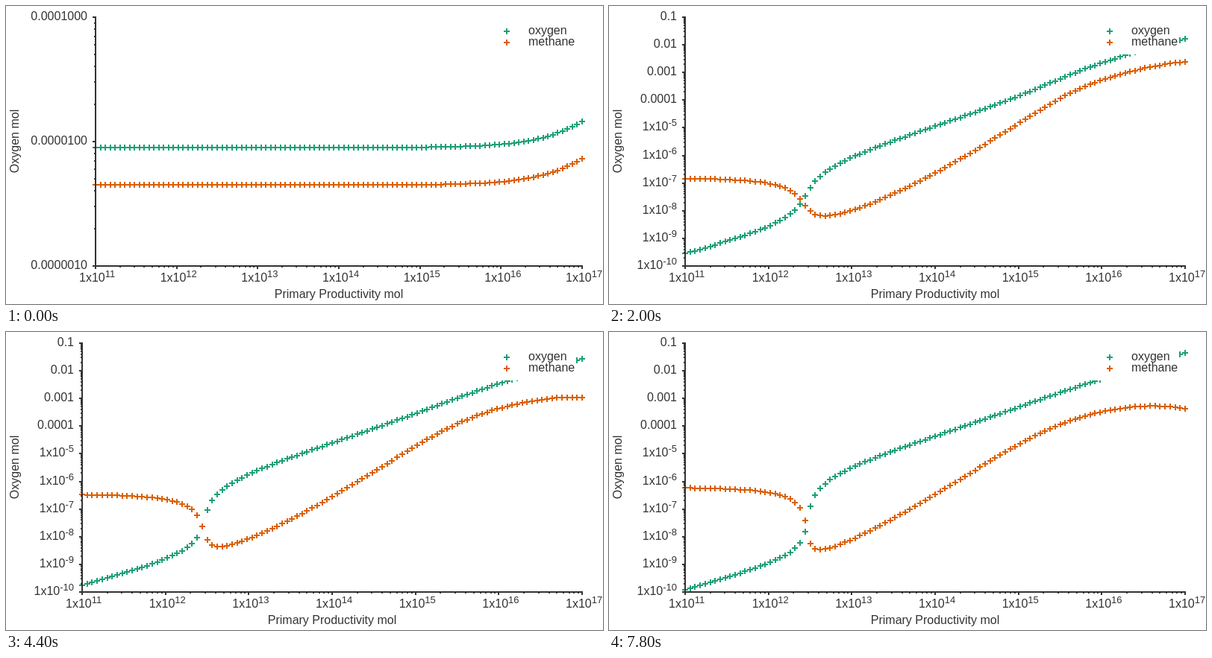
An HTML page with a canvas for the animation above (8 s loop, 800x400 px).

```html
<!DOCTYPE html>
<html lang="en">
<head>
<meta charset="utf-8">
<title>Oxygen and methane</title>
<style>
  html, body { margin: 0; width: 100%; height: 100%; overflow: hidden; background: #fff; }
  canvas { display: block; }
</style>
</head>
<body>
<canvas id="chart" width="800" height="400"></canvas>
<script>
const ctx = document.getElementById('chart').getContext('2d');
const STEP = 200, STEPS = 40, POINTS = 101;
const TOP = 15, BOTTOM = 349, RIGHT = 772;
const INK = '#333', GREEN = '#1b9e77', ORANGE = '#d95f02';
const FAMILY = '"Liberation Sans", Arial, sans-serif';
const BASE_FONT = '16px ' + FAMILY, SUP_FONT = '13px ' + FAMILY;

// Chemistry: amounts are fractions of the whole atmosphere.
const AIR = 1.773e20;            // mol
const GAIN = 1.12e-20;           // net oxidant per mol of productivity and step
const BALANCE = 2.97e12;         // productivity at which sources cancel
const ESCAPE = 0.006;            // methane escape per step

const productivity = i => 10 ** (11 + 6 * i / (POINTS - 1));

// log10 of the oxidation rate constant as a quartic in log10(oxygen)
function logRate(oxygen) {
  const p = Math.log10(oxygen * AIR);
  return (((0.0030084 * p - 0.1655405) * p + 3.2305351) * p - 25.8343054) * p + 71.5397861;
}

// share of production that escapes respiration
function share(oxygen) {
  const mol = oxygen * AIR;
  return 1 / (1 + mol / 1.36e19) / (1 + mol / 2.73e17);
}

// Steady state for a given surplus, where surplus = oxygen - 2 * methane
function balance(surplus, p) {
  let lo = -12, hi = 0, pair;
  for (let k = 0; k < 45; k++) {
    const mid = (lo + hi) / 2, small = 10 ** mid;
    pair = surplus > 0 ? [surplus + 2 * small, small] : [small, (small - surplus) / 2];
    const [o, m] = pair;
    const loss = logRate(o) + 0.7 * Math.log10(m * AIR);
    if (loss > Math.log10(share(o) * p)) hi = mid; else lo = mid;
  }
  return pair;
}

function simulate() {
  const steps = [[]];
  const surplus = new Array(POINTS).fill(0);
  for (let i = 0; i < POINTS; i++) {
    const o = 8.95e-6 + 5.55e-23 * productivity(i);
    steps[0].push([o, o / 2]);
  }
  for (let n = 1; n < STEPS; n++) {
    steps.push(surplus.map((s, i) => {
      const p = productivity(i);
      surplus[i] = s + GAIN * (p - BALANCE) + ESCAPE * steps[n - 1][i][1];
      return balance(surplus[i], p);
    }));
  }
  return steps;
}

const steps = simulate();

const FIRST = { left: 120, low: -6, high: -4 };
const LATER = { left: 102, low: -10, high: -1 };

function text(str, x, y, align = 'left', font = BASE_FONT) {
  ctx.font = font;
  ctx.textAlign = align;
  ctx.fillStyle = INK;
  ctx.fillText(str, x, y);
}

function cross(x, y, color) {
  x = Math.round(x);
  y = Math.round(y);
  ctx.fillStyle = color;
  ctx.fillRect(x - 4, y - 1, 8, 2);
  ctx.fillRect(x - 1, y - 4, 2, 8);
}

function power(exp, x, y) {
  text('1x10', x, y);
  ctx.font = BASE_FONT;
  text(exp, x + ctx.measureText('1x10').width, y - 6, 'left', SUP_FONT);
}

function powerWidth(exp) {
  ctx.font = BASE_FONT;
  const base = ctx.measureText('1x10').width;
  ctx.font = SUP_FONT;
  return base + ctx.measureText(exp).width;
}

// Calls mark(position, isMajor) for each tick of a log axis
function logTicks(low, high, mark) {
  for (let d = low; d <= high; d++) {
    mark(d, true);
    for (let k = 2; k < 10 && d < high; k++) mark(d + Math.log10(k), false);
  }
}

function drawAxes(axis, toX, toY) {
  ctx.fillStyle = INK;
  ctx.fillRect(axis.left - 1, TOP - 1, 2, BOTTOM - TOP + 2);
  ctx.fillRect(axis.left - 1, BOTTOM - 1, RIGHT - axis.left + 2, 2);
  logTicks(11, 17, (v, major) => {
    ctx.fillRect(Math.round(toX(v)) - 1, BOTTOM, 2, major ? 4 : 2);
  });
  logTicks(axis.low, axis.high, (v, major) => {
    const len = major ? 4 : 2;
    ctx.fillRect(axis.left - len, Math.round(toY(v)) - 1, len, 2);
  });

  for (let d = 11; d <= 17; d++) power(String(d), toX(d) - 22, 370);
  for (let d = axis.low; d <= axis.high; d++) {
    const end = axis.left - 11, y = toY(d) + 4;
    if (axis === FIRST) text((10 ** d).toFixed(7), end, y, 'right');
    else if (d >= -4) text((10 ** d).toFixed(-d), end, y, 'right');
    else power(String(d), end - powerWidth(String(d)), y);
  }

  text('Primary Productivity mol', (axis.left + RIGHT) / 2, 392, 'center');
  ctx.save();
  ctx.translate(17, 181.5);
  ctx.rotate(-Math.PI / 2);
  text('Oxygen mol', 0, 0, 'center');
  ctx.restore();
}

function drawLegend() {
  ctx.fillStyle = '#fff';
  ctx.fillRect(642, 18, 122, 47);
  cross(671, 34, GREEN);
  cross(671, 49, ORANGE);
  text('oxygen', 700, 38);
  text('methane', 700, 53);
}

function draw(n) {
  const axis = n === 0 ? FIRST : LATER;
  const toX = v => axis.left + (v - 11) / 6 * (RIGHT - axis.left);
  const toY = v => BOTTOM - (v - axis.low) / (axis.high - axis.low) * (BOTTOM - TOP);
  ctx.fillStyle = '#fff';
  ctx.fillRect(0, 0, 800, 400);
  [GREEN, ORANGE].forEach((color, gas) => {
    steps[n].forEach((pair, i) => {
      cross(toX(Math.log10(productivity(i))), toY(Math.log10(pair[gas])), color);
    });
  });
  drawLegend();
  drawAxes(axis, toX, toY);
}

const start = performance.now();
function tick() {
  const t = Math.max(0, performance.now() - start);
  draw(Math.floor(t / STEP) % STEPS);
  requestAnimationFrame(tick);
}
tick();
</script>
</body>
</html>
```
